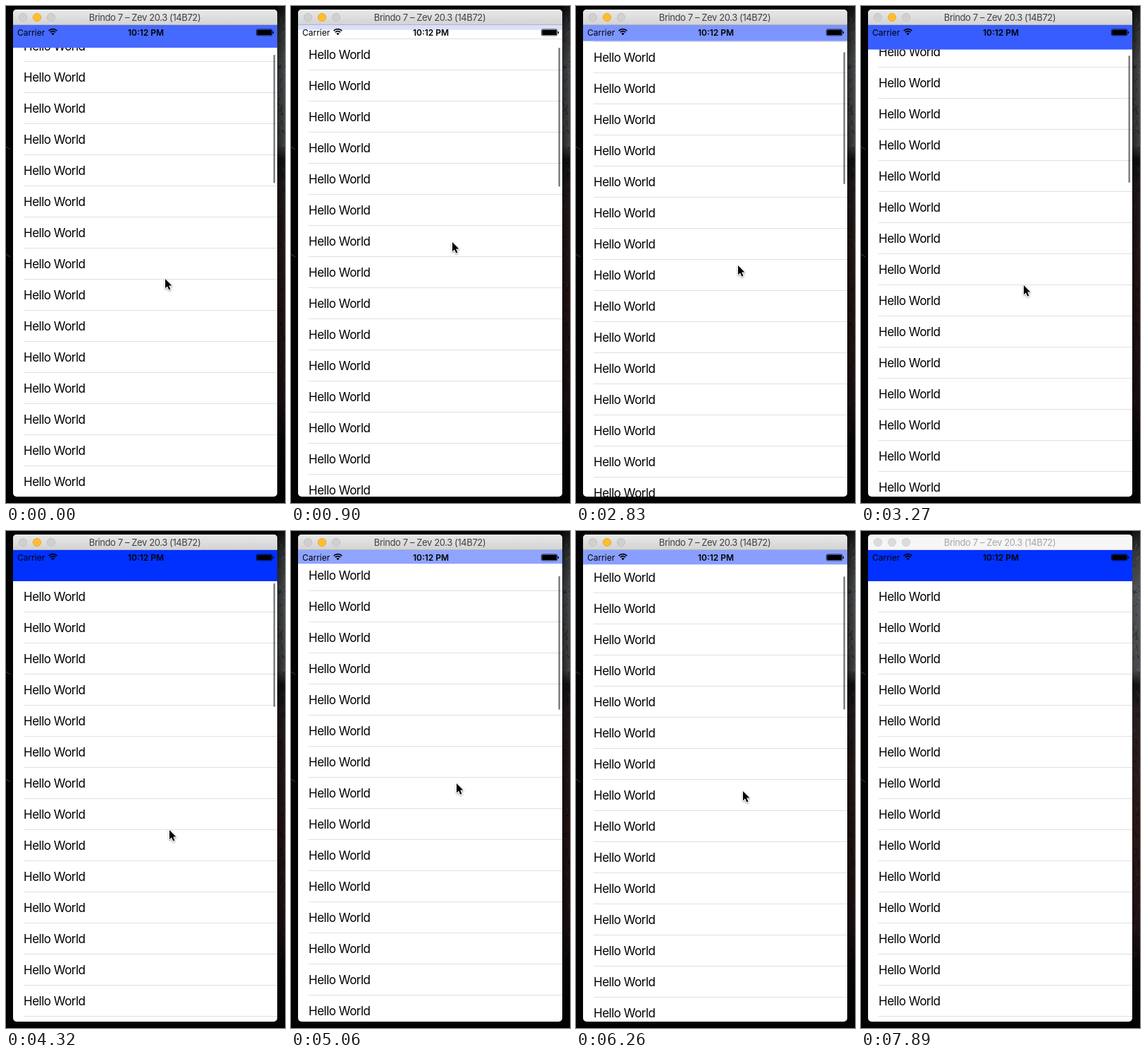
Animation of 396x703 px, one loop 7990 ms. Source, as an HTML page with a canvas:

```html
<!DOCTYPE html>
<html lang="en">
<head>
<meta charset="utf-8">
<title>Collapsing bar</title>
<style>
html, body { margin: 0; width: 100%; height: 100%; overflow: hidden; background: #000; }
canvas { display: block; width: 396px; height: 703px; }
</style>
</head>
<body>
<canvas id="stage"></canvas>
<script>
const W = 396, H = 703, LOOP = 7990, STEP = 148.87;
const WIN = { x: 10, y: 5, w: 375, h: 689 };
const TOP = 27, BAR = 44, ROW = 44, ROWS = 50, BOTTOM = 694;
const FONT = 'Inter, "Open Sans", sans-serif';

// [step, value...]; values run straight between steps
const OFFSET = [[0, 24], [6, 74.7], [8, 90], [9, 93], [13, 91], [19, 42.7], [24, 3], [26, 0],
  [29, 0], [30, 6], [34, 49.3], [38, 78], [39, 76], [42, 47.3], [44, 10], [45, 0]];
const POINTER = [[0, 226, 386], [6, 229, 334], [9, 229, 316], [13, 229, 316], [19, 230, 367],
  [25, 232, 423], [29, 232, 423], [34, 235, 357], [38, 236, 328], [42, 237, 368],
  [45, 238, 416], [47, 238, 420], [51, 240, 708]];
const INDICATOR = [[46, 1], [48, 0]];

const canvas = document.getElementById('stage');
const ratio = window.devicePixelRatio || 1;
canvas.width = W * ratio;
canvas.height = H * ratio;
const ctx = canvas.getContext('2d');
ctx.scale(ratio, ratio);

function at(keys, n) {
  if (n <= keys[0][0]) return keys[0].slice(1);
  for (let i = 1; i < keys.length; i++) {
    const a = keys[i - 1], b = keys[i];
    if (n <= b[0]) {
      const k = (n - a[0]) / (b[0] - a[0]);
      return a.slice(1).map((v, j) => v + (b[j + 1] - v) * k);
    }
  }
  return keys[keys.length - 1].slice(1);
}

function rect(x, y, w, h, color) {
  ctx.fillStyle = color;
  ctx.fillRect(x, y, w, h);
}

function round(x, y, w, h, r) {
  ctx.beginPath();
  ctx.roundRect(x, y, w, h, r);
}

function text(str, x, y, size, color, { weight = 400, spacing = 0, align = 'left' } = {}) {
  ctx.font = `${weight} ${size}px ${FONT}`;
  ctx.letterSpacing = spacing + 'px';
  ctx.textAlign = align;
  ctx.fillStyle = color;
  ctx.fillText(str, x, y);
}

function gradient(x0, y0, x1, y1, stops) {
  const g = ctx.createLinearGradient(x0, y0, x1, y1);
  stops.forEach(([p, c]) => g.addColorStop(p, c));
  return g;
}

function drawDesktop(active) {
  let seed = 11;
  const rand = () => (seed = seed * 16807 % 2147483647) / 2147483647;
  rect(0, 0, W, H, '#030303');
  rect(385, 0, 11, H, gradient(0, 0, 0, H, [
    [0, '#161616'], [.04, '#3c3e40'], [.12, '#5c6063'], [.28, '#505356'], [.31, '#151414'],
    [.36, '#2c2222'], [.6, '#301819'], [.8, '#221315'], [.87, '#0a0808'], [1, '#040404']]));
  ctx.lineWidth = 1;
  for (let i = 0; i < 150; i++) {
    const x = 384 + rand() * 12, y = 10 + rand() * 590;
    ctx.strokeStyle = rand() < .6 ? 'rgba(0,0,0,.45)' : y < 215 ? 'rgba(190,198,204,.28)' : 'rgba(130,100,100,.2)';
    ctx.beginPath();
    ctx.moveTo(x, y);
    ctx.lineTo(x + rand() * 10 - 5, y + rand() * 12 - 3);
    ctx.stroke();
  }
  ctx.strokeStyle = 'rgba(150,150,150,.4)';
  for (const y of [199, 351]) {
    ctx.beginPath();
    ctx.moveTo(0, y);
    ctx.lineTo(6, y + 4);
    ctx.stroke();
  }
  const shade = active ? .55 : .2;
  rect(385, 0, 11, H, gradient(385, 0, 396, 0, [[0, `rgba(0,0,0,${shade})`], [1, `rgba(0,0,0,${shade * .4})`]]));
}

function drawTitle(active) {
  const { x, y, w } = WIN;
  rect(x, y, w, 22, active ? gradient(0, y, 0, TOP, [[0, '#e9e9e9'], [1, '#d2d2d2']]) : '#f6f6f6');
  rect(x, TOP - 1, w, 1, active ? '#b5b5b5' : '#dadada');
  const lights = active
    ? [['#d0d0d0', '#bdbdbd'], ['#ffbd2e', '#e3a321'], ['#d0d0d0', '#bdbdbd']]
    : Array(3).fill(['#dcdcdc', '#cbcbcb']);
  lights.forEach(([fill, edge], i) => {
    ctx.beginPath();
    ctx.arc(24 + i * 20, 16, 5.6, 0, 7);
    ctx.fillStyle = fill;
    ctx.fill();
    ctx.strokeStyle = edge;
    ctx.lineWidth = .8;
    ctx.stroke();
  });
  text('Brindo 7 – Zev 20.3 (14B72)', 197, 21, 13, active ? '#404040' : '#a6a6a6',
    { align: 'center', spacing: -.4 });
}

function drawStatus() {
  text('Carrier', 16, 41.5, 12, '#000');
  text('10:12 PM', 198.5, 41.5, 12, '#000', { weight: 600, align: 'center' });

  ctx.strokeStyle = '#000';
  ctx.lineWidth = 1.7;
  for (const r of [8.3, 5.3]) {
    ctx.beginPath();
    ctx.arc(66.5, 41, r, -Math.PI * .75, -Math.PI * .25);
    ctx.stroke();
  }
  ctx.beginPath();
  ctx.moveTo(66.5, 41.3);
  ctx.arc(66.5, 41.3, 3.2, -Math.PI * .75, -Math.PI * .25);
  ctx.fillStyle = '#000';
  ctx.fill();

  round(355.4, 32.9, 22.6, 9, 2);
  ctx.lineWidth = .7;
  ctx.stroke();
  round(356.3, 33.7, 20.8, 7.4, 1.2);
  ctx.fill();
  round(378.6, 35.7, 1.5, 3.4, [0, 1.2, 1.2, 0]);
  ctx.fill();
}

function drawList(offset, shift, top, alpha) {
  const height = BOTTOM - top;
  ctx.save();
  ctx.beginPath();
  ctx.rect(WIN.x, top, WIN.w, height);
  ctx.clip();
  const first = TOP + BAR - Math.round(offset + shift);
  for (let i = 0; i < ROWS; i++) {
    const y = first + i * ROW;
    if (y > BOTTOM) break;
    if (y + ROW < TOP) continue;
    text('Hello World', 25, y + 28, 17, '#000', { spacing: -.5 });
    rect(25, y + ROW - 1, 360, 1, '#e0e0e2');
  }
  if (alpha > 0) {
    const part = height / (ROWS * ROW);
    round(379.5, top + 3 + offset * part, 2.5, (height - 6) * part, 1.25);
    ctx.fillStyle = `rgba(0,0,0,${.5 * alpha})`;
    ctx.fill();
  }
  ctx.restore();
}

function drawPointer(x, y) {
  ctx.save();
  ctx.translate(x, y);
  const arrow = new Path2D('M0 0V13.2L3 10.4L5.3 15.6L7.5 14.7L5.2 9.6H9.4Z');
  ctx.shadowColor = 'rgba(0,0,0,.4)';
  ctx.shadowBlur = 2.5 * ratio;
  ctx.shadowOffsetY = ratio;
  ctx.lineWidth = 2;
  ctx.lineJoin = 'round';
  ctx.strokeStyle = '#fff';
  ctx.stroke(arrow);
  ctx.shadowColor = 'transparent';
  ctx.fillStyle = '#000';
  ctx.fill(arrow);
  ctx.restore();
}

function draw(n) {
  const active = n < 53;
  const [offset] = at(OFFSET, n);
  const shift = Math.min(BAR, offset / 2);
  const top = TOP + BAR - shift;

  drawDesktop(active);
  ctx.save();
  round(WIN.x, WIN.y, WIN.w, WIN.h, 5);
  ctx.clip();
  rect(WIN.x, WIN.y, WIN.w, WIN.h, '#fff');
  drawList(offset, shift, top, at(INDICATOR, n)[0]);
  rect(WIN.x, TOP, WIN.w, top - TOP, `rgba(0,49,255,${1 - shift / BAR})`);
  drawStatus();
  drawTitle(active);
  ctx.restore();
  if (n < 51) drawPointer(...at(POINTER, n));
}

const start = performance.now();
let shown = -1;
function tick() {
  const t = (performance.now() - start) % LOOP;
  const n = Math.min(53, Math.floor((t + 6) / STEP));
  if (n !== shown) draw(shown = n);
  requestAnimationFrame(tick);
}
tick();
</script>
</body>
</html>
```
